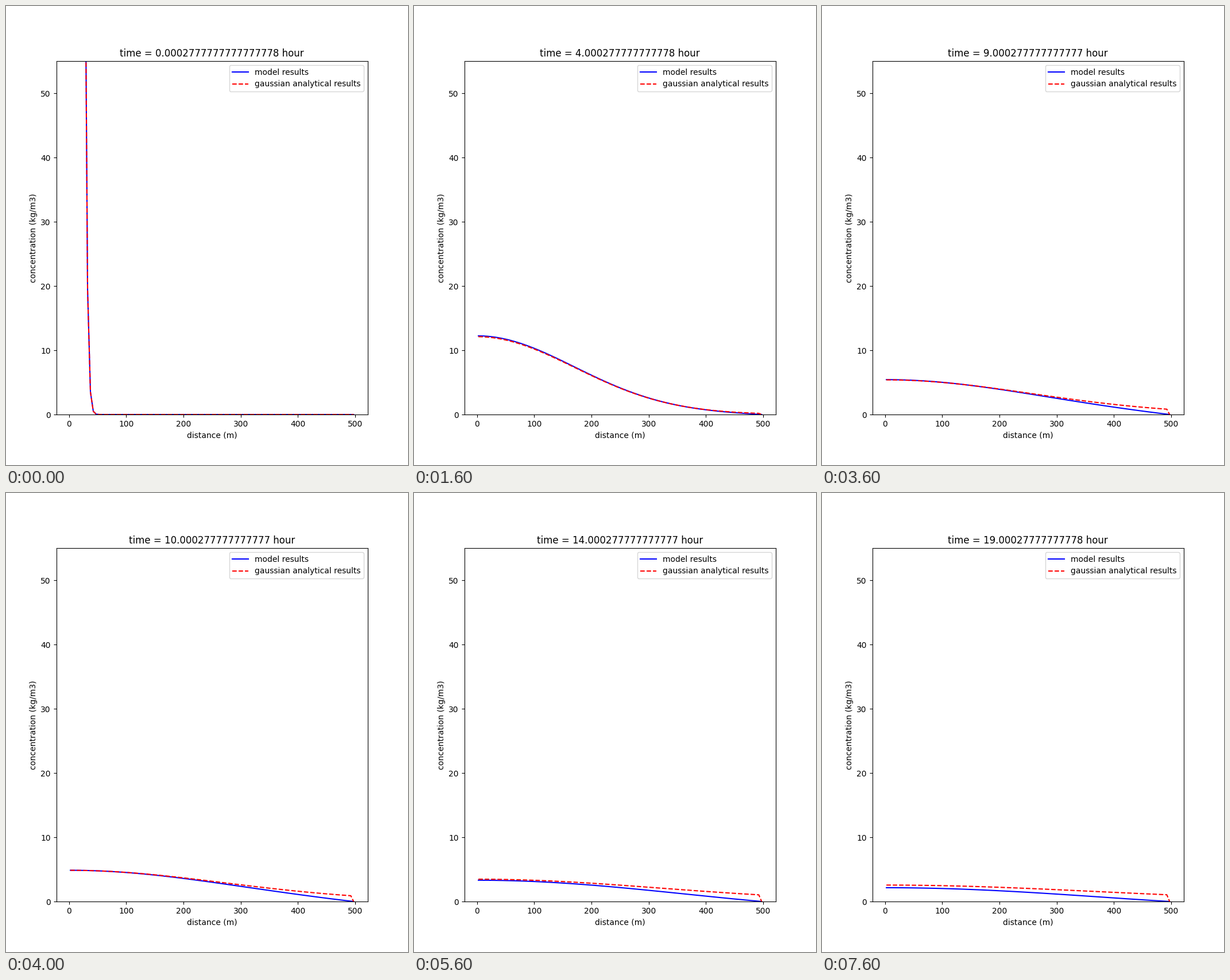
A matplotlib script for the animation above (8000 ms loop, 700 by 800 pixels).

```python
import numpy as np
import matplotlib.pyplot as plt
from matplotlib.animation import FuncAnimation

FRAMES = 20
INTERVAL = 400       # ms, one frame per simulated hour
CELLS = 100
DR = 5.0             # m
DIFFUSIVITY = 1.0    # m2/s
MASS = 2.2e6         # kg per metre of depth
START_AGE = 50       # s, age of the plume at model start

r = (np.arange(CELLS) + 0.5) * DR


def gaussian(seconds):
    """Radial point-source solution, zero in the outermost cell."""
    spread = 4 * DIFFUSIVITY * (START_AGE + seconds)
    c = MASS / (np.pi * spread) * np.exp(-r**2 / spread)
    c[-1] = 0
    return c


def step_matrix(dt=1.0):
    """Explicit radial diffusion step with a fixed zero outer cell."""
    k = DIFFUSIVITY * dt / DR**2
    inner = k * (r - DR / 2) / r
    outer = k * (r + DR / 2) / r
    step = np.diag(1 - inner - outer)
    step += np.diag(inner[1:], -1) + np.diag(outer[:-1], 1)
    step[-1] = 0
    return step


def run_model():
    second = step_matrix()
    hour = np.linalg.matrix_power(second, 3600)
    states = [second @ gaussian(0)]
    for _ in range(FRAMES - 1):
        states.append(hour @ states[-1])
    return states


model = run_model()

fig, ax = plt.subplots(figsize=(7, 8), dpi=100)
model_line, = ax.plot(r, model[0], "b-", label="model results")
exact_line, = ax.plot(r, gaussian(1), "r--", label="gaussian analytical results")
ax.set_ylim(0, 55)
ax.set_xlabel("distance (m)")
ax.set_ylabel("concentration (kg/m3)")
ax.legend(loc="upper right")


def update(hour):
    seconds = 3600 * hour + 1
    model_line.set_ydata(model[hour])
    exact_line.set_ydata(gaussian(seconds))
    ax.set_title(f"time = {seconds / 3600} hour")
    return model_line, exact_line


anim = FuncAnimation(fig, update, frames=FRAMES, interval=INTERVAL,
                     repeat=True, repeat_delay=0)
plt.show()
```
